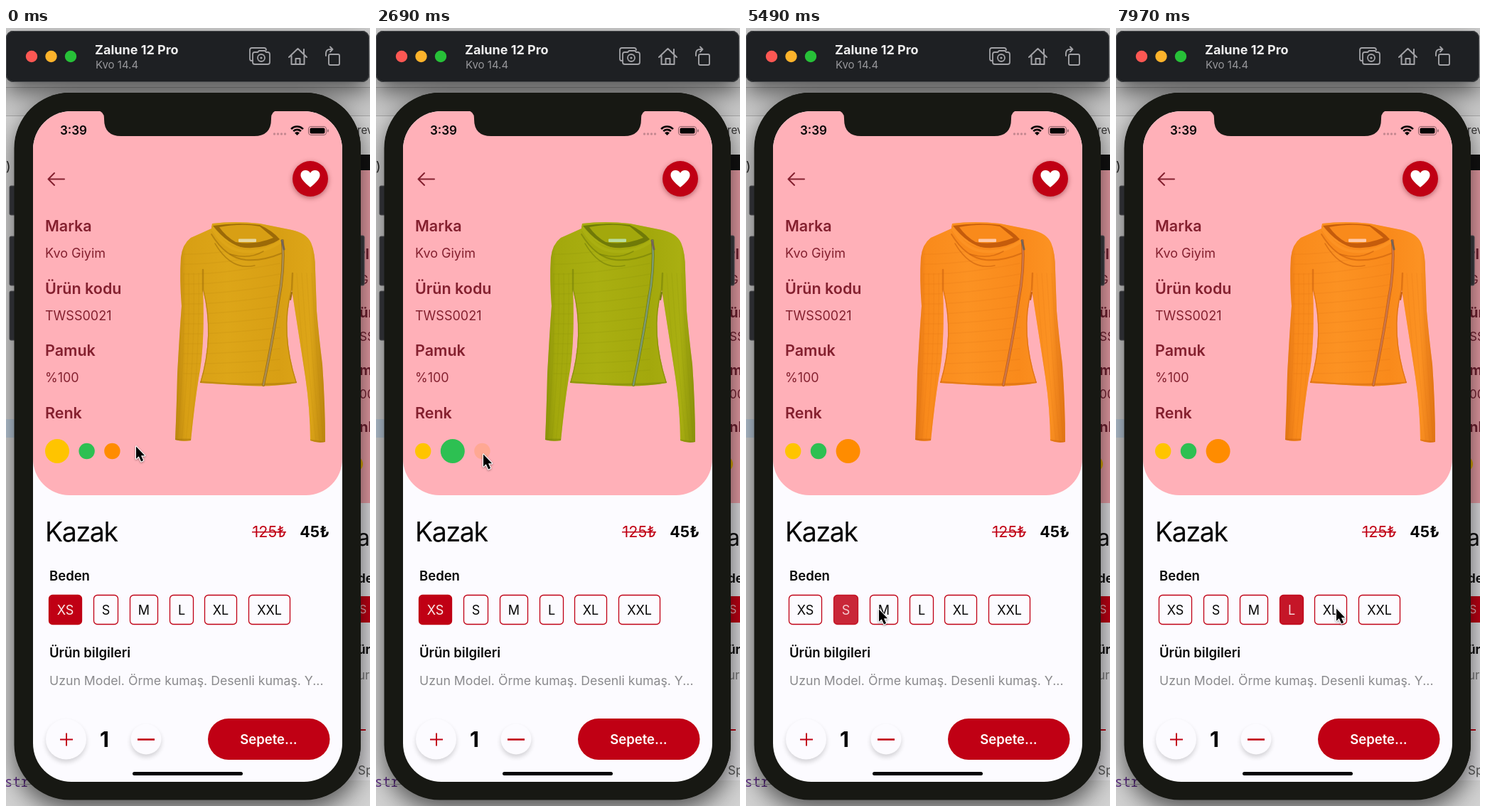
These frames come from a looping animation (512x1094 px, 7990 ms). An HTML page with a canvas:

```html
<!DOCTYPE html>
<html lang="tr">
<head>
<meta charset="utf-8">
<title>Kazak</title>
<style>
html, body { margin: 0; width: 100%; height: 100%; overflow: hidden; background: #bbb; }
canvas { display: block; width: 512px; height: 1094px; }
</style>
</head>
<body>
<canvas id="stage"></canvas>
<script>
const W = 512, H = 1094, LOOP = 7990;
const RED = '#c00014', PINK = '#ffb0b8', WINE = '#84202f', WHITE = '#fcfbff';
const canvas = document.getElementById('stage');
const dpr = window.devicePixelRatio || 1;
canvas.width = W * dpr;
canvas.height = H * dpr;
const g = canvas.getContext('2d');

// Each tap dims its item, then selects it a little later.
const taps = [
  { kind: 'color', i: 1, down: 900, select: 1550 },
  { kind: 'color', i: 2, down: 2450, select: 3340 },
  { kind: 'size', i: 1, down: 4600, select: 5318 },
  { kind: 'size', i: 2, down: 5900, select: 6564 },
  { kind: 'size', i: 3, down: 7120, select: 7725 }
];
const pointer = [
  [0, 183, 587], [250, 183, 587], [750, 119, 590], [1710, 123, 591],
  [2000, 123, 591], [2350, 151, 598], [2800, 151, 598], [3530, 128, 780],
  [3800, 128, 780], [4350, 136, 816], [4900, 136, 816], [5450, 187, 816],
  [6100, 187, 816], [6700, 256, 817], [7300, 256, 817], [7900, 310, 815]
];
const swatches = ['#ffc400', '#2dc052', '#ff8c00'];
const knits = [
  { base: '#d89f14', dark: '#9c6a08', light: '#e2ac1c', zip: '#a98c50', tag: '#e6d6a0' },
  { base: '#a3a80c', dark: '#707a08', light: '#b0b616', zip: '#7b9a70', tag: '#b8dc9c' },
  { base: '#f98a1b', dark: '#c55c0c', light: '#ff9a2a', zip: '#cc7648', tag: '#ffc8a8' }
];
const sizes = [['XS', 60, 47], ['S', 123, 35], ['M', 174, 40], ['L', 230, 34], ['XL', 279, 46], ['XXL', 341, 59]];

const clamp = v => Math.max(0, Math.min(1, v));
const ease = p => p < .5 ? 2 * p * p : 1 - 2 * (1 - p) * (1 - p);

function text(s, x, y, size, weight, color, align = 'left', track = 0, family = 'Inter, Roboto, sans-serif') {
  g.font = `${weight} ${size}px ${family}`;
  g.letterSpacing = track + 'px';
  g.textAlign = align;
  g.fillStyle = color;
  g.fillText(s, x, y);
}
function box(x, y, w, h, r, fill, stroke, lw = 1) {
  g.beginPath();
  g.roundRect(x, y, w, h, r);
  if (fill) { g.fillStyle = fill; g.fill(); }
  if (stroke) { g.strokeStyle = stroke; g.lineWidth = lw; g.stroke(); }
}
function disc(x, y, r, fill) {
  g.beginPath();
  g.arc(x, y, r, 0, Math.PI * 2);
  g.fillStyle = fill;
  g.fill();
}
function line(d, color, w) {
  g.strokeStyle = color;
  g.lineWidth = w;
  g.stroke(new Path2D(d));
}
function shape(d, fill) {
  g.fillStyle = fill;
  g.fill(new Path2D(d));
}
function shadowed(color, blur, dy, draw) {
  g.save();
  g.shadowColor = color;
  g.shadowBlur = blur * dpr;
  g.shadowOffsetY = dy * dpr;
  draw();
  g.restore();
}

function desktop() {
  g.fillStyle = '#d2d2d2';
  g.fillRect(0, 0, W, H);
  g.fillStyle = '#c8c8c8';
  g.fillRect(0, 83, W, 40);
  g.fillStyle = '#a4a4a4';
  g.fillRect(0, 83, W, 1);
  g.fillRect(0, 123, W, 1);
  g.fillStyle = '#b9c9d8';
  g.fillRect(0, 550, 14, 26);
  text(')', 0, 201, 18, 400, '#222');
  text('str', -2, 1067, 19, 400, '#5a2a80', 'left', 0, '"Noto Sans Mono", monospace');
  g.fillStyle = '#999';
  g.fillRect(0, 1063, 40, 1);

  // Second window, mostly hidden behind the phone.
  box(470, 178, 60, 40, 0, '#111');
  box(470, 200, 60, 468, 0, '#e69ca4');
  box(470, 668, 60, 390, 0, '#dedde0');
  text('rev', 494, 149, 15, 400, '#333');
  const peek = [['rl', 325, 1], ['G', 360], ['ür', 407, 1], ['SS', 440], ['m', 488, 1], ['00', 521], ['nl', 568, 1]];
  for (const [s, y, bold] of peek) text(s, 497, y, bold ? 20 : 17, bold ? 700 : 400, '#702030');
  disc(491, 613, 11, '#d9a800');
  text('a', 494, 728, 32, 400, '#111');
  text('de', 495, 780, 17, 700, '#111');
  box(470, 799, 60, 37, 0, RED);
  text('S', 497, 823, 16, 400, '#e8b0b8');
  text('ür', 495, 880, 17, 700, '#111');
  text('ur', 495, 916, 17, 400, '#777');
  box(480, 986, 26, 2, 0, RED);
  text('Sp', 495, 1050, 17, 400, '#555');
}

function titleBar() {
  box(0, 4, 511, 72, 10, '#1e2023');
  box(.5, 4.5, 510, 71, 10, null, '#45474a', 1);
  ['#fc5753', '#fdb32b', '#27c138'].forEach((c, i) => disc(36 + i * 27.5, 40, 8.2, c));
  text('Zalune 12 Pro', 125, 37, 18, 700, '#eeeeee');
  text('Kvo 14.4', 126, 57, 15, 400, '#98989c');

  const c = '#a2a2a6';
  g.lineJoin = g.lineCap = 'round';
  line('M347 46H345Q343 46 343 43V31Q343 28 346 28H363Q366 28 366 31', c, 1.8);
  line('M350 34H354L356 32H364L366 34H368Q371 34 371 37V48Q371 51 368 51H350Q347 51 347 48V37Q347 34 350 34Z', c, 1.8);
  g.beginPath();
  g.arc(359, 42, 5, 0, 7);
  g.stroke();
  disc(359, 42, 1.6, c);
  line('M398 41L410.500 29L423 41M401.500 39V51H419.500V39M407.500 51V43H413.500V51M419 36V30', c, 2);
  line('M456 37H467Q469 37 469 39V50Q469 52 467 52H456Q454 52 454 50V39Q454 37 456 37M450 39V36Q450 30 456 30H459M456 26.500L459.500 30L456 33.500', c, 1.9);
}

function phone() {
  shadowed('rgba(0,0,0,.6)', 34, 14, () => {
    g.beginPath();
    g.roundRect(0, 4, 511, 72, 10);
    g.roundRect(12, 91, 487, 994, 78);
    g.fillStyle = '#171813';
    g.fill();
  });
  for (const [y, h] of [[222, 41], [293, 69], [370, 69]]) box(5, y, 9, h, 2, '#2b2c30', '#48494c', 1);
  box(496, 292, 8, 70, 2, '#2b2c30', '#48494c', 1);
  box(11.5, 91, 487.5, 994.5, 78, '#171813');
  box(38, 117, 435, 943, 54, WHITE);
  box(38, 117, 435, 540, [54, 54, 51, 51], PINK);
  shape('M128 116H382Q373 117 373 127V128Q373 152 349 152H162Q138 152 138 128V127Q138 117 128 116Z', '#171813');
}

function statusBar() {
  text('3:39', 76, 150, 17, 600, '#050505');
  for (let i = 0; i < 4; i++) disc(377.5 + i * 5, 149, 1.7, '#c58890');
  g.lineCap = 'butt';
  g.strokeStyle = '#050505';
  g.lineWidth = 2.7;
  for (const r of [11.5, 7.2]) {
    g.beginPath();
    g.arc(409.5, 150, r, -Math.PI * .76, -Math.PI * .24);
    g.stroke();
  }
  shape('M409.500 151L406 147.500Q409.500 144.500 413 147.500Z', '#050505');
  box(425.5, 138.5, 25, 12, 3.5, null, '#8a6066', 1);
  box(427.5, 140.5, 21, 8, 2, '#050505');
  box(452, 142.5, 1.6, 4, 1, '#8a6066');
}

function knit({ base, dark, light, zip, tag }) {
  const body = new Path2D('M290 275Q322 271 357 275Q382 280 402 284Q422 288 429 302Q435 316 435 340L437 398Q440 433 445 473Q449 530 449 582Q438 584 428 580Q428 538 421 490Q412 432 402 368Q386 428 409 499Q370 506 324 502L273 499Q293 432 277 368Q280 446 271 492Q265 530 260 580Q248 582 238 579Q240 530 241 487Q244 430 247 391Q244 353 246 323Q248 304 260 295Q276 288 289 282Z');
  g.save();
  g.fillStyle = base;
  g.fill(body);
  g.clip(body);
  const shade = g.createLinearGradient(238, 0, 449, 0);
  shade.addColorStop(0, dark);
  shade.addColorStop(.07, base);
  shade.addColorStop(.35, light);
  shade.addColorStop(.7, base);
  shade.addColorStop(.9, light);
  shade.addColorStop(1, dark);
  g.globalAlpha = .5;
  g.fillStyle = shade;
  g.fillRect(230, 265, 225, 325);

  g.globalAlpha = .1;
  for (let i = 0; i < 13; i++) {
    const y = 318 + i * 14;
    line(`M250 ${y}Q300 ${y + 1} 385 ${y - 17 + i}`, dark, 1.5);
  }
  for (let i = 0; i < 4; i++) {
    line(`M${250 + i * 7} 345Q${252 + i * 7} 460 ${241 + i * 6} 580`, dark, 1.3);
    line(`M${409 + i * 7} 345Q${416 + i * 7} 460 ${431 + i * 5} 580`, dark, 1.3);
  }
  g.globalAlpha = .5;
  line('M277 340V368Q293 432 273 499M403 345L402 368Q386 428 409 499', dark, 2.5);
  g.globalAlpha = .4;
  line('M274 498Q340 504 409 499M238 579H261M428 580L449 583', dark, 3);

  // Draped collar.
  g.globalAlpha = 1;
  shape('M291 278Q325 273 357 277Q375 285 385 297Q367 312 337 310Q312 305 291 278Z', dark);
  shape('M300 280Q332 274 357 279L376 295Q349 306 323 301Q309 293 300 280Z', base);
  box(327, 296.5, 25, 4.5, 1, tag);
  shape('M289 277Q303 303 329 308Q360 313 386 297L388 318Q355 334 324 325Q301 314 289 287Z', base);
  g.globalAlpha = .55;
  line('M291 283Q308 311 334 314Q363 317 387 300', light, 4);
  line('M289 290Q309 323 337 326Q361 328 387 317', dark, 2);
  line('M294 303Q317 342 350 334M315 318Q342 326 362 314', dark, 1.5);
  g.restore();

  g.lineCap = 'round';
  line('M389 299Q392 340 383 385Q376 435 362 502', dark, 4);
  line('M389 299Q392 340 383 385Q376 435 362 502', zip, 2.6);
  line('M388 299L391 311', '#756456', 3);
  line('M402 372L400 382', dark, 2);
}

function details(t) {
  g.lineCap = g.lineJoin = 'round';
  line('M82 212.500H60M68 204L59.500 212.500L68 221', WINE, 2);
  shadowed('rgba(90,0,10,.45)', 7, 2, () => disc(428, 212, 25, RED));
  shape('M428 224Q414 213 414.500 206.500Q415 200 421 200Q426 200 428 204Q430 200 435 200Q441 200 441.500 206.500Q442 213 428 224Z', '#fff');

  const rows = [['Marka', 'Kvo Giyim'], ['Ürün kodu', 'TWSS0021'], ['Pamuk', '%100'], ['Renk', '']];
  rows.forEach(([head, value], i) => {
    const y = 286 + i * 87.5;
    text(head, 55, y, 21.5, 600, WINE);
    text(value, 55, y + 37, 18, 400, WINE);
  });

  const picked = current('color', t);
  knit(knits[picked]);
  let x = 55;
  swatches.forEach((c, i) => {
    const r = i === picked ? 17 : 11.2;
    g.globalAlpha = opacity('color', i, t);
    disc(x + r, 595, r, c);
    g.globalAlpha = 1;
    x += r * 2 + 13.4;
  });
}

function order(t) {
  text('Kazak', 55, 722, 37.5, 400, '#060606', 'left', -1.4);
  text('125₺', 394, 716, 21.5, 400, RED, 'right');
  box(346, 708, 48, 1.6, 0, RED);
  text('45₺', 455, 716, 21.5, 700, '#060606', 'right');
  text('Beden', 61, 777, 18.5, 600, '#060606');

  const picked = current('size', t);
  sizes.forEach(([label, x, w], i) => {
    const on = i === picked;
    g.globalAlpha = opacity('size', i, t);
    box(x + .5, 797.5, w - 1, 41, 5, on ? RED : WHITE, RED, 1.3);
    text(label, x + w / 2, 825, 18, 400, on ? '#fbeaec' : '#060606', 'center');
    g.globalAlpha = 1;
  });

  text('Ürün bilgileri', 61, 885, 18.5, 600, '#060606');
  text('Uzun Model. Örme kumaş. Desenli kumaş. Y...', 61, 924, 17.7, 400, '#8a8a8d');

  shadowed('rgba(0,0,0,.16)', 6, 4, () => {
    disc(84.5, 1000, 28.5, WHITE);
    disc(197, 1000, 21.5, WHITE);
  });
  g.lineCap = 'butt';
  line('M76 1000.500H94M85 991.500V1009.500', RED, 1.9);
  line('M185 1000.500H209', RED, 2.6);
  text('1', 138.5, 1011, 30, 700, '#060606', 'center');
  box(284, 971, 171.5, 58, 29, RED);
  text('Sepete...', 369.5, 1007, 18.5, 600, '#fff', 'center');
  box(178, 1046, 155, 5, 2.5, '#050505');
}

function current(kind, t) {
  let i = 0;
  for (const tap of taps) if (tap.kind === kind && t >= tap.select) i = tap.i;
  return i;
}
function opacity(kind, i, t) {
  const tap = taps.find(p => p.kind === kind && p.i === i);
  if (!tap || t < tap.down) return 1;
  return t < tap.select
    ? 1 - .8 * ease(clamp((t - tap.down) / 150))
    : .2 + .8 * ease(clamp((t - tap.select) / 250));
}

function cursor(t) {
  let k = 0;
  while (k < pointer.length - 2 && t >= pointer[k + 1][0]) k++;
  const [t0, x0, y0] = pointer[k], [t1, x1, y1] = pointer[k + 1];
  const p = ease(clamp((t - t0) / (t1 - t0)));
  g.save();
  g.translate(x0 + (x1 - x0) * p, y0 + (y1 - y0) * p + 1.5);
  g.scale(.84, .84);
  const arrow = 'M0 0V20.500L4.500 16.500L8.500 25L12 23.300L8.300 15.300H14.500Z';
  shadowed('rgba(0,0,0,.4)', 3, 1, () => line(arrow, '#fff', 2.6));
  shape(arrow, '#000');
  g.restore();
}

// Playback cadence: a 100 ms hold, then two 20 ms steps.
function cadence(t) {
  const cycle = Math.floor((t - 30) / 140);
  const phase = t - 30 - cycle * 140;
  const step = phase < 100 ? 0 : phase < 120 ? 1 : 2;
  return Math.max(0, 30 + cycle * 140 + step * 140 / 3);
}

function draw(now) {
  const t = cadence(now % LOOP);
  g.setTransform(dpr, 0, 0, dpr, 0, 0);
  g.lineJoin = 'round';
  desktop();
  phone();
  titleBar();
  statusBar();
  details(t);
  order(t);
  cursor(t);
}

const start = performance.now();
function tick() {
  draw(performance.now() - start);
  requestAnimationFrame(tick);
}
tick();
</script>
</body>
</html>
```
